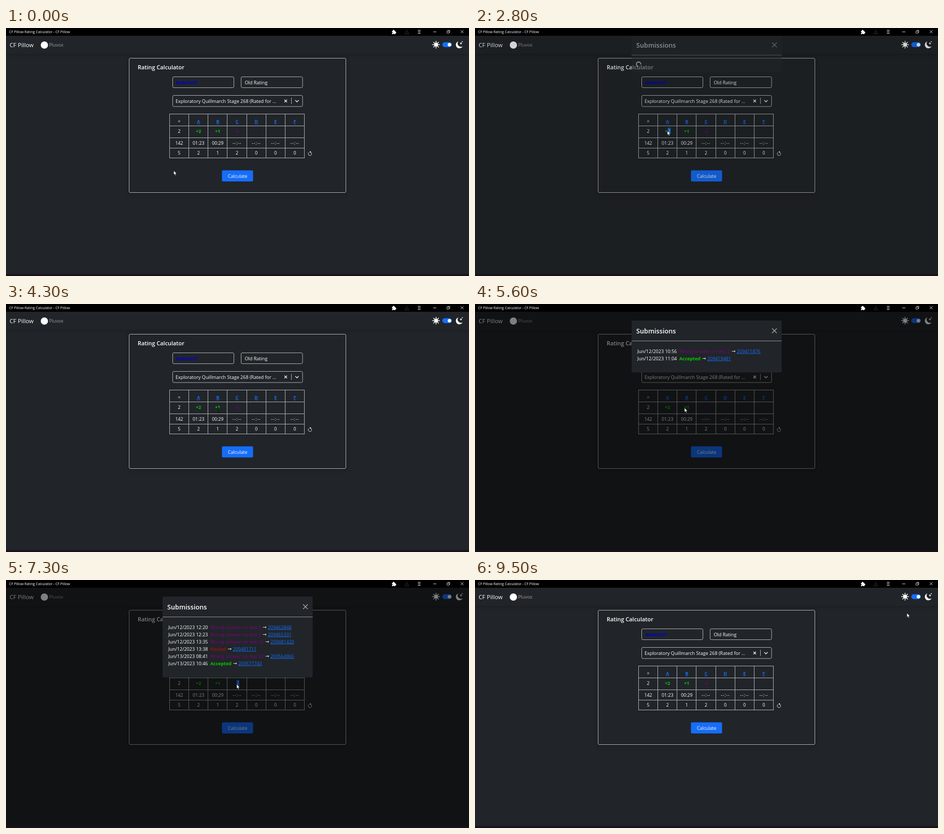
Write an HTML page that moves like this. It is 893 by 480 pixels and loops after 9600 ms.

```html
<!DOCTYPE html>
<html lang="en">
<head>
<meta charset="utf-8">
<title>CF Pillow Rating Calculator</title>
<style>
  html, body { margin: 0; width: 100%; height: 100%; overflow: hidden; background: #212529; }
  svg { display: block; width: 893px; height: 480px; font: 9px "Open Sans", "Noto Sans", sans-serif; }
  .link { fill: #146cf6; text-decoration: underline; }
</style>
</head>
<body>
<svg id="stage" viewBox="0 0 893 480" fill="#fff"></svg>
<script>
const stage = document.getElementById('stage');
const LOOP = 9600, STEP = 100;
const BLUE = '#166df9', GREEN = '#00cc00', PURPLE = '#800080', LINE = '#acaeb0';

const text = (x, y, s, size = 9, attrs = '') =>
  `<text x="${x}" y="${y}" font-size="${size}" ${attrs}>${s}</text>`;
const centred = (x, y, s, attrs = '') => text(x, y, s, 8.8, `text-anchor="middle" ${attrs}`);
const rect = (x, y, w, h, attrs = '') =>
  `<rect x="${x}" y="${y}" width="${w}" height="${h}" ${attrs}/>`;
const circle = (x, y, r, attrs = '') => `<circle cx="${x}" cy="${y}" r="${r}" ${attrs}/>`;
const stroke = (d, color = '#fff', width = 1, attrs = '') =>
  `<path d="${d}" fill="none" stroke="${color}" stroke-width="${width}" ${attrs}/>`;
const box = (x, y, w, h) => rect(x, y, w, h, `rx="2.5" fill="none" stroke="${LINE}"`);

function titleBar() {
  return rect(0, 0, 893, 15, 'fill="#000"')
    + text(6, 10, 'CF Pillow Rating Calculator - CF Pillow', 6.8)
    + rect(744.5, 5.5, 6.5, 6.5) + circle(747.7, 5, 1.5) + circle(751.2, 8.7, 1.5)
    + circle(744.6, 8.8, 1.1, 'fill="#000"') + circle(747.7, 12, 1.1, 'fill="#000"')
    + stroke('M773 3.5V9M770.5 7L773 9.3 775.5 7M769.5 9V11.5H776.5V9', '#2c2c2c')
    + stroke('M794.5 4.5H799.5M794.5 7.5H799.5M794.5 10.5H799.5', '#fff', 1.1)
    + stroke('M824 7.5H830', '#ddd', .9)
    + stroke('M850.5 6H854.5V10H850.5ZM852 5.5V4.5H856V8.5H855', '#ddd', .8)
    + stroke('M877 4.5L882.5 10M882.5 4.5L877 10', '#ddd', .9);
}

function navBar() {
  let rays = '';
  for (let i = 0; i < 8; i++) {
    const c = Math.cos(i * Math.PI / 4), s = Math.sin(i * Math.PI / 4);
    rays += `M${829.5 + 5 * c} ${32.3 + 5 * s}L${829.5 + 6.7 * c} ${32.3 + 6.7 * s}`;
  }
  return rect(0, 14, 893, 36, 'fill="#212529" style="filter:drop-shadow(0 2px 3px #0003)"')
    + text(7, 37, 'CF Pillow', 11.2)
    + circle(74, 33, 7)
    + text(83, 35.5, 'Pluvox', 9, 'fill="#9b9d9f"')
    + circle(829.5, 32.3, 4) + stroke(rays, '#fff', 1.5, 'stroke-linecap="round"')
    + rect(841.5, 27.5, 18.5, 9.5, `rx="4.75" fill="${BLUE}"`) + circle(855.3, 32.3, 3.4)
    + '<path d="M872.5 26A6.8 6.8 0 1 0 880.6 35.4A6.3 6.3 0 0 1 872.5 26Z"/>'
    + '<path d="M877.5 27.2l.8 1.8 1.8.8-1.8.8-.8 1.8-.8-1.8-1.8-.8 1.8-.8ZM880 25l.5 1 1 .5-1 .5-.5 1-.5-1-1-.5 1-.5Z"/>';
}

function table() {
  const left = 315.5, col = 37.15, rows = [166.5, 189.5, 212.5, 232.5, 251.5];
  const mid = i => left + col * (i + .5);
  const right = left + 7 * col;
  let grid = rows.map(y => `M${left} ${y}H${right}`).join('');
  for (let i = 0; i <= 7; i++) grid += `M${Math.floor(left + i * col) + .5} 166V252`;
  const row = (y, cells) => cells.map((s, i) =>
    centred(mid(i), y, s, s.startsWith('--') ? 'letter-spacing=".7"' : '')).join('');
  return stroke(grid, LINE)
    + centred(mid(0), 184, '=')
    + [...'ABCDEF'].map((s, i) => centred(mid(i + 1), 184, s, 'class="link" font-weight="700"')).join('')
    + centred(mid(0), 203, '2')
    + ['+2', '+1', '-2'].map((s, i) =>
        centred(mid(i + 1), 203, s, `font-weight="700" fill="${i < 2 ? GREEN : '#700070'}"`)).join('')
    + row(226, ['142', '01:23', '00:29', '--:--', '--:--', '--:--', '--:--'])
    + row(245, ['5', '2', '1', '2', '0', '0', '0']);
}

function page() {
  return rect(0, 0, 893, 480, 'fill="#212529"') + navBar()
    + rect(237, 58, 419, 261, 'rx="3" fill="#212529" style="filter:drop-shadow(0 3px 4px #0003)"')
    + box(237.5, 58.5, 418, 260)
    + text(254, 80, 'Rating Calculator', 10.9, 'font-weight="600"')
    + box(321.5, 94.5, 118, 21) + box(453.5, 94.5, 118.5, 21) + box(321.5, 130.5, 250.5, 21.5)
    + text(328, 108.5, 'Nobrin37', 8.9, 'font-weight="700" fill="#0000d0"')
    + text(460.5, 108.5, 'Old Rating', 9.05)
    + text(327, 145, 'Exploratory Quillmarch Stage 268 (Rated for ...', 9.05)
    + stroke('M537 138.7L542 143.7M542 138.7L537 143.7', '#eee', 1.3)
    + stroke('M550.5 135V147', LINE)
    + stroke('M558 139.8L561.2 143 564.4 139.8', '#eee', 1.3)
    + table()
    + stroke('M584.3 240.9A3.3 3.3 0 1 0 588.2 240.8', '#eee', .9)
    + '<path d="M586 238.3L588.9 240 586 241.8Z"/>'
    + rect(416.5, 275.5, 60, 21.5, `rx="2.5" fill="${BLUE}"`)
    + centred(446.7, 290, 'Calculate');
}

// Each submission: time, verdict, x of the id, id
const wrong = n => 'Wrong answer on test ' + n;
const modals = [
  { open: 2750, close: 3895, list: [
    ['12/2023 11:21', wrong(2), 505, '209436275'],
    ['12/2023 11:40', wrong(2), 505, '209449362'],
    ['12/2023 11:58', 'Accepted', 448, '209455917']] },
  { open: 4850, close: 5945, list: [
    ['12/2023 10:56', wrong(2), 505, '209411876'],
    ['12/2023 11:04', 'Accepted', 448, '209419481']] },
  { open: 6870, close: 8445, list: [
    ['12/2023 12:20', wrong(3), 505, '209463848'],
    ['12/2023 12:23', wrong(3), 505, '209465331'],
    ['12/2023 13:35', wrong(10), 510, '209481420'],
    ['12/2023 13:38', 'Hacked', 437.5, '209481711'],
    ['13/2023 08:41', wrong(22), 510, '209564965'],
    ['13/2023 10:46', 'Accepted', 448, '209577743']] },
];
const verdictStyle = s => s === 'Accepted' ? `fill="${GREEN}" font-weight="700"`
  : `fill="${s === 'Hacked' ? '#e00000' : PURPLE}"`;

const clamp = x => Math.min(1, Math.max(0, x));
const easeOut = x => 1 - (1 - clamp(x)) ** 1.7;

function submission([time, verdict, x, id], i) {
  const y = 94.5 + 14 * i;
  return text(313, y, 'Jun/' + time, 9.04) + text(394, y, verdict, 8.87, verdictStyle(verdict))
    + stroke(`M${x - 9.5} ${y - 3}h6.5m-2 -1.8l2 1.8l-2 1.8`, '#fff', .8)
    + text(x, y, id, 8.87, 'class="link"');
}

function modal(t, { open, close, list }) {
  if (t < open || t > close + 300) return '';
  const opacity = easeOut((t - open) / 150) * (1 - clamp((t - close) / 150));
  const shade = clamp((t - open) / 150) * (1 - clamp((t - close - 150) / 150)) / 2;
  const shift = -26 * (t < close ? 1 - easeOut((t - open) / 300) : easeOut((t - close) / 300));
  const loading = t < open + 350;
  const bottom = loading ? 105 : 104.5 + 14 * list.length;
  const turn = (t - open) / 750 * 360 - 15;
  const body = loading
    ? stroke('M315.5 93.2A4.2 4.2 0 1 1 319.7 89', '#fff', 1.9, `transform="rotate(${turn} 315.5 89)"`)
    : list.map(submission).join('');
  return rect(0, 15, 893, 465, `fill="#000" opacity="${shade}"`)
    + `<g opacity="${opacity}" transform="translate(0 ${shift})">`
    + rect(302, 32, 289.5, bottom - 32, 'rx="2" fill="#212529"')
    + text(311, 57, 'Submissions', 12.7, 'font-weight="600"')
    + stroke('M573 47.3L582 56.3M582 47.3L573 56.3', '#a6a8a9', 1.3)
    + stroke('M302 71.5H591.5', '#8e9193') + body + '</g>';
}

const highlight = x => rect(x, 193, 5.7, 13, 'fill="#0b63ce"')
  + centred(x + 2.8, 203, '2', 'fill="#d5e4ff"');
const selection = t => t >= 2700 && t < 3900 ? highlight(371.6)
  : t >= 6400 && t < 8450 ? highlight(444.4) : '';

// Pointer stops: time, x, y
const stops = [[0, 323.5, 276], [1000, 335, 287], [1800, 345, 287], [2400, 371, 199], [3950, 371, 199],
  [4250, 410, 202], [4500, 410, 202], [4700, 404, 201], [6000, 404, 201], [6400, 445, 202],
  [8500, 445, 202], [8950, 330, 281], [9050, 330, 281], [9500, 833, 64], [LOOP, 833, 64]];

function pointer(t) {
  const i = stops.findIndex(s => s[0] > t);
  const [t0, x0, y0] = stops[i - 1], [t1, x1, y1] = stops[i];
  const p = (t - t0) / (t1 - t0), k = p * p * (3 - 2 * p);
  const x = x0 + (x1 - x0) * k, y = y0 + (y1 - y0) * k;
  if (t >= 4200 && t <= 4500)
    return stroke(`M${x - 1.5} ${y}h3m-1.5 0v8m-1.5 0h3`, '#07100c', .9);
  return `<path transform="translate(${x} ${y})" d="M0 0V8.2L1.9 6.5 3.2 9.5 4.6 8.9 3.3 6H5.8Z" stroke="#111" stroke-width=".6"/>`;
}

const pageMarkup = page();
const frameMarkup = titleBar() + rect(0, 476.5, 893, 3.5, 'fill="#1b101b"');
let shown = -1;

function draw(now) {
  const t = Math.floor(now % LOOP / STEP) * STEP;
  if (t !== shown) {
    shown = t;
    stage.innerHTML = pageMarkup + selection(t) + modals.map(m => modal(t, m)).join('')
      + frameMarkup + pointer(t);
  }
  requestAnimationFrame(draw);
}
draw(performance.now());
</script>
</body>
</html>
```
